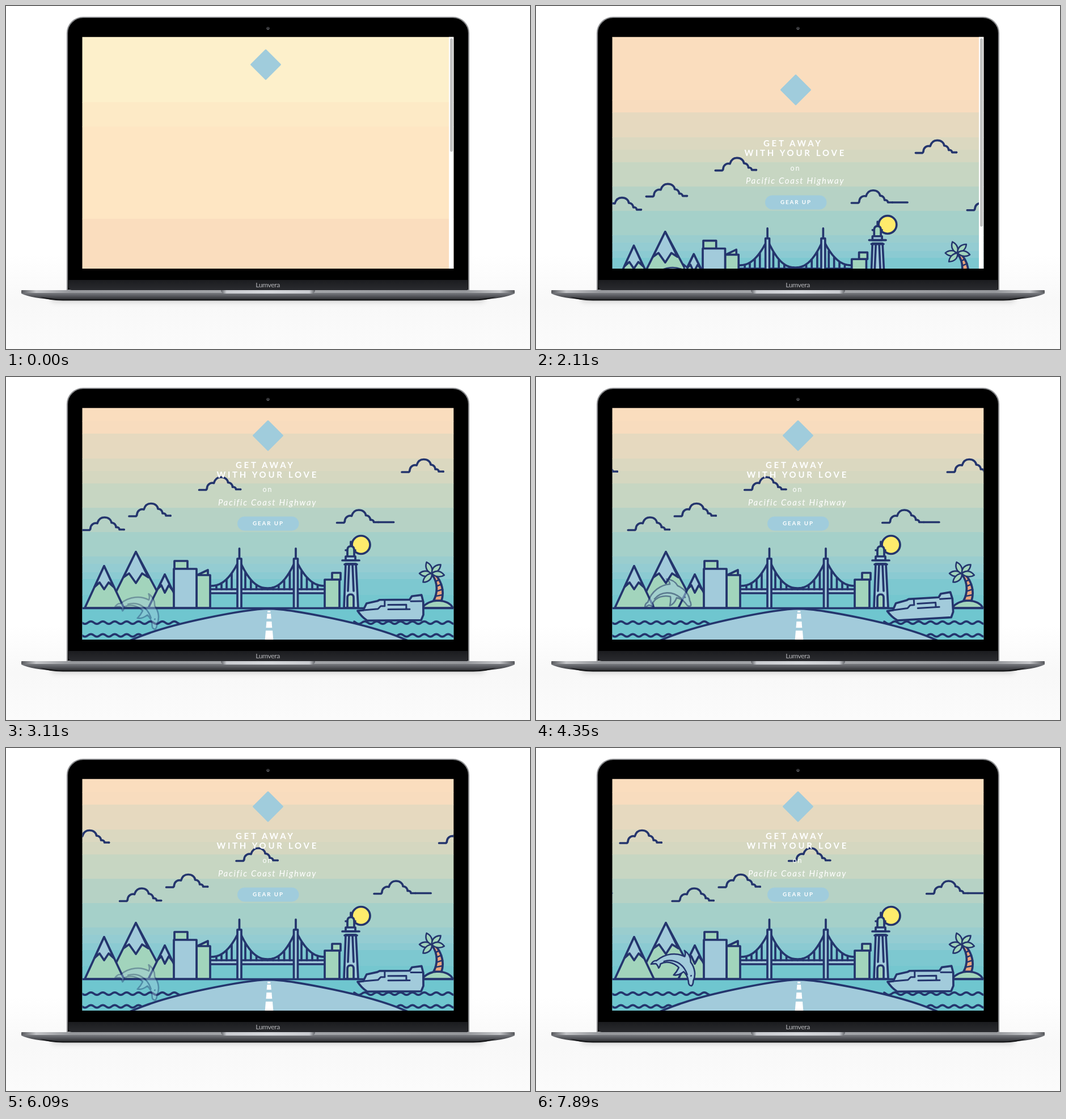
Recreate the animation shown at these times as an HTML page. Size 924 px wide and 606 px high, loop 8 s.

```html
<!DOCTYPE html>
<html lang="en">
<head>
<meta charset="utf-8">
<title>Coast road</title>
<style>
  html, body { margin: 0; width: 100%; height: 100%; overflow: hidden; background: #fff; }
  svg { display: block; }
  text { font-family: Lato, sans-serif; fill: #fff; white-space: pre; }
  .ink { stroke: #24356d; stroke-width: 3.7; stroke-linecap: round; stroke-linejoin: round; fill: none; }
  .green { fill: #a2d4bc; }
  .blue { fill: #a2cbdb; }
  .thin { stroke-width: 2.6; }
</style>
</head>
<body>
<svg width="924" height="606" viewBox="0 0 924 606">
  <defs>
    <clipPath id="screen"><rect x="134.500" y="54.800" width="654.800" height="409.200"/></clipPath>
    <linearGradient id="floor" x2="0" y2="1">
      <stop offset="0" stop-color="#fff"/><stop offset=".5" stop-color="#f8f8f8"/><stop offset="1" stop-color="#fbfbfb"/>
    </linearGradient>
    <linearGradient id="under" x2="0" y2="1">
      <stop offset="0" stop-color="#8b8d91"/><stop offset=".4" stop-color="#6a6c71"/><stop offset="1" stop-color="#2c2d31"/>
    </linearGradient>
    <linearGradient id="lip">
      <stop offset="0" stop-color="#55575b"/><stop offset=".03" stop-color="#c4c5c8"/><stop offset=".1" stop-color="#95979b"/>
      <stop offset=".5" stop-color="#a5a7ab"/><stop offset=".9" stop-color="#95979b"/><stop offset=".97" stop-color="#c4c5c8"/><stop offset="1" stop-color="#55575b"/>
    </linearGradient>
    <linearGradient id="notch">
      <stop offset="0" stop-color="#5d5f64"/><stop offset=".06" stop-color="#c9cbd0"/><stop offset=".5" stop-color="#d6d8dc"/>
      <stop offset=".94" stop-color="#c9cbd0"/><stop offset="1" stop-color="#5d5f64"/>
    </linearGradient>
    <linearGradient id="chin" x2="0" y2="1">
      <stop offset="0" stop-color="#1b1c1f"/><stop offset="1" stop-color="#2a2b2f"/>
    </linearGradient>
    <filter id="soft" x="-10%" y="-200%" width="120%" height="500%"><feGaussianBlur stdDeviation="5"/></filter>
    <path id="puff" class="ink" d="M0 0H12Q14-1 14-4C15-10 20-13.500 26-12C28-19 33-22.500 38.500-22.500C46-22.500 50.500-18 51-13C56-13 59-9 59-5C63-6 65-3 65-1H73"/>
    <path id="leaf" class="ink green thin" d="M0 0C6-7 15-7 22 0C15 6 6 5 0 0Z"/>
  </defs>

  <!-- laptop -->
  <rect y="440" width="924" height="166" fill="url(#floor)"/>
  <rect x="80" y="512" width="764" height="11" rx="5" fill="#777" opacity=".3" filter="url(#soft)"/>
  <path d="M108 502V48A28 28 0 0 1 136 20H788A28 28 0 0 1 816 48V502Z" fill="#000" stroke="#8d8e91" stroke-width="2.200"/>
  <path d="M110 484H814V502H116Q110 502 110 495Z" fill="url(#chin)"/>
  <circle cx="462" cy="39.500" r="2.600" fill="#55565a"/><circle cx="462" cy="39" r="1.200" fill="#16171a"/>
  <text x="461.500" y="497" text-anchor="middle" font-size="12.200" letter-spacing="-.4" style="fill:#b4b5b8">Lumvera</text>
  <path d="M27 503V508Q45 517 92 519H832Q879 517 897 508V503Z" fill="url(#under)"/>
  <path d="M60 514Q75 520 100 520.500H824Q849 520 864 514L832 518H92Z" fill="#18191b"/>
  <rect x="27" y="502" width="870" height="5" rx="1" fill="url(#lip)"/>
  <path d="M379 502H545Q545 508 537 508H387Q379 508 379 502Z" fill="url(#notch)"/>

  <g clip-path="url(#screen)">
    <g id="page">
      <g id="sky"></g>
      <g id="scene">
        <circle cx="626" cy="296.500" r="16" class="ink" style="fill:#ffeb6c"/>

        <!-- mountains -->
        <g class="ink">
          <path class="green" d="M180 408L229 309L282 408Z"/>
          <path class="blue" d="M207 354L229 309L251 354L240 347L229 364L217 347Z"/>
          <path class="green" d="M251 408L280 349L309 408Z"/>
          <path class="blue" d="M268 374L280 349L293 376L287 368L280 381L274 368Z"/>
          <path class="green" d="M139 408L173 334L208 408Z"/>
          <path class="blue" d="M156 371L173 334L190 371L181 363L173 375L165 363Z"/>
        </g>

        <!-- bridge -->
        <rect x="360" y="375" width="202" height="7" class="blue"/>
        <path id="cables" class="ink"/>
        <path class="ink" d="M360 375H562M360 382H562"/>
        <g id="towers"></g>

        <!-- buildings -->
        <g class="ink">
          <path class="green" d="M297 325H320V339H297ZM337 350L356 341V350M336 350H360V408H336Z"/>
          <path class="blue" d="M296 339H336V408H296Z"/>
          <path class="green" d="M575 346H590V358H575Z"/>
          <path class="green" d="M562 358H588V408H562Z"/>
        </g>

        <!-- lighthouse -->
        <g class="ink">
          <path class="blue" d="M599 330L596 408H621L617 330Z"/>
          <path d="M608 291V299M605 331L603 378M611 331L613 378"/>
          <path class="green" d="M602 317V306Q602 299 608 299Q614 299 614 306V317"/>
          <path class="blue" d="M599 317H616V324H599Z"/>
          <path d="M593 324H623M597 331H619M599 306H602M614 306H616"/>
          <path class="green" d="M602 408V390Q602 384 608 384Q613 384 613 390V408Z"/>
        </g>

        <!-- island -->
        <path class="ink green" d="M733 408Q745 395 762 395Q782 396 788 408Z"/>
        <path class="ink" style="fill:#e9a47c" d="M752 350C762 364 761 382 754 395H768C773 380 769 362 757 349Z"/>
        <path class="ink thin" d="M758 361L764 358M761 369L768 366M761 378L770 375M759 387L769 385"/>
        <g id="leaves"></g>

        <!-- sea and road -->
        <rect x="130" y="408" width="664" height="60" fill="#6fc6cf"/>
        <path id="waves" class="ink"/>
        <path class="ink blue" d="M216 467C252 450 300 437 350 426.500C400 416 440 409.500 463 409.500C486 409.500 526 416 576 426.500C626 437 675 450 711 467Z"/>
        <path fill="#fff" d="M461.500 413H466L466.400 416H461ZM460.500 418H467L467.800 427H459.700ZM459.400 432H468.400L469.300 443H458.500ZM458 448H470L471.300 464H456.700Z"/>
        <path class="ink" d="M134 408.500H790"/>

        <g id="ship" class="ink">
          <path class="blue" d="M620 413L630 412L636 400L655 396L659 394H712L716 388L733 386L736 398V421L732 430.500H637Q627 424 620 413Z"/>
          <path d="M630 412L656 410L661 405H668V395M674 403H706M674 411H712M714 397H734M706 403V411" stroke-width="3"/>
        </g>
        <g id="dolphin" class="ink thin">
          <path class="blue" d="M-37-6C-30-26-14-37 2-38Q1-44-4-47Q10-46 16-35C28-30 36-20 37-9Q40-4 39 0Q34 3 30-4C26-9 20-13 14-14Q10-3 2 0Q4-8 3-16C-10-19-22-15-28-5Q-26 1-27 3Q-32-1-35-1Q-39 1-42 4Q-42-4-37-6Z"/>
          <path d="M-25-12C-14-25 6-27 22-13M29-15V-14.500"/>
        </g>
        <g id="clouds"></g>
      </g>

      <g id="copy">
        <text x="405" y="160.500" font-size="15" font-weight="700" letter-spacing="3.700">GET AWAY</text>
        <text x="371.500" y="177.500" font-size="15" font-weight="700" letter-spacing="3.700">WITH YOUR LOVE</text>
        <text x="452.500" y="203" font-size="12.500" letter-spacing="2">on</text>
        <text x="374" y="226.500" font-size="15" font-style="italic" letter-spacing="1.700">Pacific Coast Highway</text>
        <rect x="408" y="246.500" width="108.500" height="25" rx="12.500" fill="#a0ccdc"/>
        <text x="435" y="262.300" font-size="9.800" font-weight="700" letter-spacing="1.900">GEAR UP</text>
      </g>
    </g>
    <rect id="badge" x="-19.500" y="-19.500" width="39" height="39" rx="1.500" fill="#a0ccdc"/>
    <g id="bar">
      <rect x="781" y="54" width="9" height="411" fill="#fff"/>
      <rect id="thumb" x="783" y="57" width="5" rx="2.500" fill="#c1c1c1"/>
    </g>
  </g>
</svg>
<script>
const LOOP = 8000, VIEW = 409, WIDE = 655, LEFT = 134, BASE = 464;
const $ = id => document.getElementById(id);
const put = (id, attrs) => { for (const k in attrs) $(id).setAttribute(k, attrs[k]); };
const range = (from, to, step) => Array.from({ length: Math.floor((to - from) / step) + 1 }, (_, i) => from + i * step);
const line = points => 'M' + points.map(p => p.map(n => n.toFixed(1)).join(' ')).join('L');

const bands = [
  [-360, '#fdf0cb'], [-239, '#fdeac6'], [-196, '#fee6c3'], [-33, '#faddbe'], [78, '#f8dcbe'],
  [100, '#e6d9bf'], [144, '#dbd8c0'], [166, '#d5d7c0'], [188, '#c7d6c2'], [231, '#b6d2c5'],
  [274, '#a5d0c9'], [317, '#9acdce'], [330, '#94ccd2'], [345, '#8bcad2'], [357, '#7dc8d0'], [385, '#75c7cf']
];
$('sky').innerHTML = bands.map(([y, c], i) => {
  const end = i + 1 < bands.length ? bands[i + 1][0] : 480;
  return `<rect x="130" y="${y}" width="664" height="${end - y + .6}" fill="${c}"/>`;
}).join('');

// Suspension cables hang from towers at 411.5 and 511
function cableY(x) {
  if (x < 411.5) return 369 - 46 * ((x - 361) / 50.5) ** 2.3;
  if (x > 511) return 369 - 46 * ((562 - x) / 51) ** 2.3;
  return 373 - 50 * (Math.abs(x - 461.2) / 49.8) ** 2.3;
}
const hangers = [...range(371, 402, 9), ...range(422, 502, 9.8), ...range(521, 552, 9.5)];
put('cables', {
  d: line(range(361, 562, 1.5).map(x => [x, cableY(x)])) +
     hangers.map(x => `M${x} ${cableY(x)}V375`).join('')
});
$('towers').innerHTML = [411.5, 511].map(x =>
  `<path class="ink blue" d="M${x} 303V321M${x - 3.5} 408V321H${x + 3.5}V408"/>`).join('');

$('leaves').innerHTML = [-180, -115, -45, 8, 135].map(a =>
  `<use href="#leaf" transform="translate(751 347) rotate(${a})"/>`).join('');

const wave = (y, from, to) => line(range(from, to, 1.5).map(x => [x, y + 2.2 * Math.sin((x - 134) * Math.PI / 10.5)]));
put('waves', { d: wave(434, 134, 306) + wave(434, 614, 790) + wave(456.5, 134, 246) + wave(456.5, 680, 790) });

// left end at CLOUD_TIME, base line, extra length of the right tail
const CLOUD_TIME = 3110;
const clouds = [[135, 270.5, 0], [217, 246, 0], [340.5, 199.5, 0], [583.5, 257.5, 27], [698, 168, 0]];
$('clouds').innerHTML = clouds.map(([, y, tail]) => '<g>' + [0, -WIDE].map(x =>
  `<use href="#puff" x="${x}" y="${y}"/><path class="ink" d="M${x + 73} ${y - 1}h${tail}"/>`).join('') + '</g>').join('');

// time, x, y, angle, opacity
const leap = [
  [0, 230, 425, 32, .4], [350, 229, 430, 33, 0], [650, 222, 420, -25, 0], [1240, 234, 404, 0, .55],
  [1800, 241, 400, 31, 1], [1980, 240, 409, 32, .95], [2980, 230, 425, 32, .4]
];
const mod = (a, n) => ((a % n) + n) % n;
function tween(keys, t) {
  const i = keys.findIndex(k => k[0] > t), a = keys[i - 1], b = keys[i];
  const f = (t - a[0]) / (b[0] - a[0]);
  return a.map((v, j) => v + (b[j] - v) * f);
}
function swing(t, start, length) {
  const x = Math.min(1, Math.max(0, (t - start) / length));
  return .5 - Math.cos(x * Math.PI) / 2;
}

function draw(t) {
  const drop = VIEW * (1 - swing(t, 1192, 1326));
  const scrolling = drop > 3;
  const scale = scrolling ? 647 / WIDE : 1;
  const shift = scrolling ? -4 : 0;

  put('page', { transform: `translate(0 ${drop})` });
  put('scene', { transform: `translate(${LEFT} ${BASE}) scale(${scale}) translate(${-LEFT} ${-BASE})` });
  put('copy', { transform: `translate(${shift} 0)` });
  const lift = VIEW * (1 - swing(t, 1176, 1185));
  put('badge', { transform: `translate(${462 + shift} ${103.5 + drop - lift}) rotate(45)` });
  put('bar', { visibility: scrolling ? 'visible' : 'hidden' });
  put('thumb', { height: VIEW * VIEW / (VIEW + drop) - 4 });

  [...$('clouds').children].forEach((g, i) => {
    const x = mod(clouds[i][0] - LEFT + .022 * (t - CLOUD_TIME), WIDE) + LEFT;
    g.setAttribute('transform', `translate(${x} 0)`);
  });

  const [, x, y, angle, opacity] = tween(leap, mod(t - 3110, 2980));
  put('dolphin', { transform: `translate(${x} ${y}) rotate(${angle})`, opacity });
  put('ship', { transform: `rotate(${-4.2 * Math.sin(t * Math.PI / 1000) ** 2} 630 424)` });
}

function tick() {
  draw(performance.now() % LOOP);
  requestAnimationFrame(tick);
}
tick();
</script>
</body>
</html>
```
